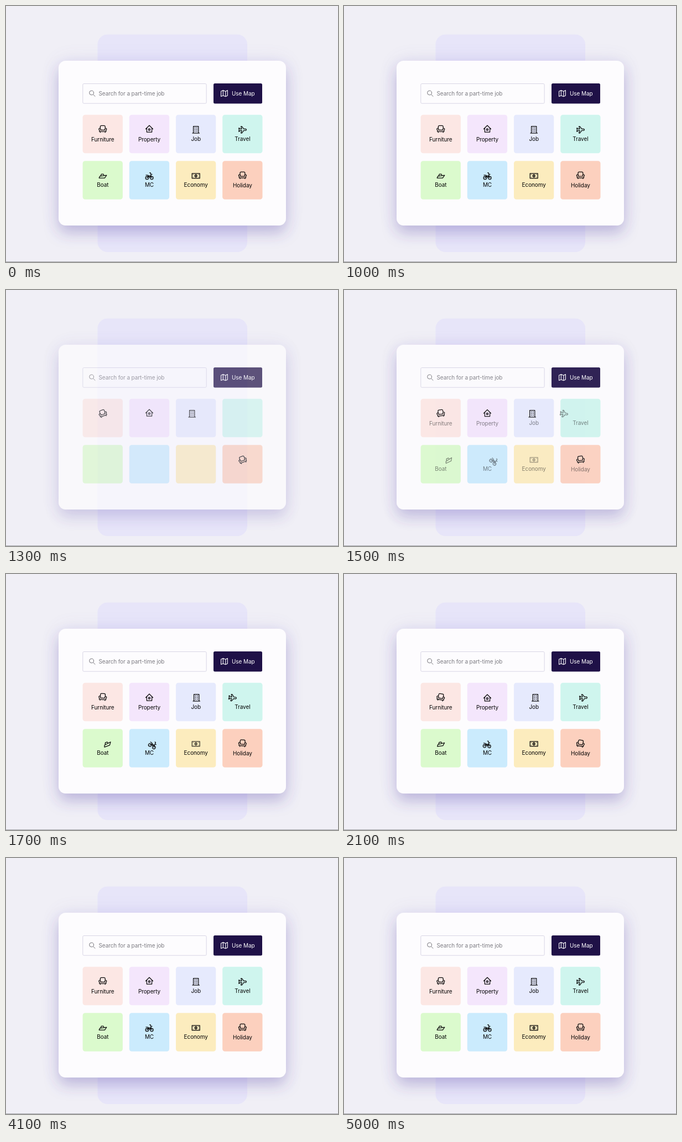
An HTML page that plays this animation: 600x463 px, repeating every 5.1 s.

```html
<!DOCTYPE html>
<html lang="en">
<head>
<meta charset="utf-8">
<title>Category cards</title>
<style>
  html, body { margin: 0; width: 100%; height: 100%; overflow: hidden; background: #f0eff6; }
  svg { display: block; width: 100%; height: 100%; }
  text { font: 400 10px Inter, "Open Sans", sans-serif; letter-spacing: -0.1px; }
  .label { text-anchor: middle; fill: #050505; }
  .icon { fill: none; stroke: #0a0a0a; stroke-width: 1.25; stroke-linejoin: round; stroke-linecap: round; }
  .solid { fill: #0a0a0a; stroke: none; }
</style>
</head>
<body>
<svg viewBox="0 0 600 463" xmlns="http://www.w3.org/2000/svg">
  <defs>
    <filter id="shadow" x="-20%" y="-25%" width="140%" height="155%">
      <feDropShadow dx="0" dy="14" stdDeviation="13" flood-color="#4a3aa0" flood-opacity=".27"/>
    </filter>
    <filter id="glow" x="-20%" y="-25%" width="140%" height="150%">
      <feGaussianBlur stdDeviation="18"/>
    </filter>
  </defs>
  <rect width="600" height="463" fill="#f0eff6"/>
  <rect x="165.5" y="51.5" width="270.5" height="393.5" rx="18" fill="#e7e5f9"/>
  <rect y="462" width="600" height="1" fill="#a5a5aa"/>
  <g id="screen">
    <rect x="95" y="99" width="411" height="298" rx="13" fill="#6a5ac0" opacity=".1" filter="url(#glow)"/>
    <rect x="95" y="99" width="411" height="298" rx="13" fill="#fdfcfe" filter="url(#shadow)"/>
    <rect x="138.8" y="140.5" width="223.4" height="35.7" rx="2" fill="#fdfcfe" stroke="#d8d5e5"/>
    <g fill="none" stroke="#77767c" stroke-width="1" stroke-linecap="round">
      <circle cx="154.6" cy="157" r="3.9"/>
      <path d="M157.5 160 161 163.4"/>
    </g>
    <text x="167.5" y="162.1" fill="#7d7c82">Search for a part-time job</text>
    <rect x="375" y="140" width="88" height="36.5" rx="2.5" fill="#1f1147"/>
    <path d="M388.6 154.2 392.4 152.6 396.8 154.4 400.4 152.6V162L396.8 163.8 392.4 162 388.6 163.6ZM392.4 152.6V162M396.8 154.4V163.8"
      fill="none" stroke="#fff" stroke-width="1.1" stroke-linejoin="round"/>
    <text x="408" y="162.1" fill="#fff">Use Map</text>
    <g id="tiles"></g>
  </g>
</svg>
<script>
const LOOP = 5100;

const sofa = `<path d="M-4.4-1.6V-4Q-4.4-6-2.4-6H2.4Q4.4-6 4.4-4V-1.6
  M-3.8 2V.2A1.6 1.6 0 1 0-6 1.9V4.8H6V1.9A1.6 1.6 0 1 0 3.8.2V2ZM-4.4 5V6.4M4.4 5V6.4"/>`;
const home = `<path d="M-6.5.5 0-6 6.5.5M-4.6-1V6H4.6V-1"/>
  <rect x="-1.4" y="0" width="2.8" height="2.8"/>`;
const windows = [-3.3, -.3, 2.7].map(y =>
  `<rect class="solid" x="-2.4" y="${y - .7}" width="1.5" height="1.5"/>
   <rect class="solid" x=".9" y="${y - .7}" width="1.5" height="1.5"/>`).join("");
const block = `<path d="M-4.6 6V-6H4.6V6M-6.2 6.2H6.2"/>${windows}`;
const plane = `<path d="M7 0Q7-1.4 5.5-1.4H2.3L-1.1-6H-2.8L-1.4-1.4H-4.2L-5.5-3H-6.8L-6 0
  -6.8 3H-5.5L-4.2 1.4H-1.4L-2.8 6H-1.1L2.3 1.4H5.5Q7 1.4 7 0Z"/>`;
const boat = `<path d="M-6.6 3.8-5.2.5 7-1.2 3.5 3.8ZM-3.9.2-2.4-3.2H1.3L2.2-.6"/>`;
const bike = `<circle cx="-4.1" cy="3.5" r="2.7"/><circle cx="4.3" cy="3.5" r="2.7"/>
  <path d="M-4.1 3.5-1.8-.2H3L4.3 3.5M-6-1.6-2.4-1.2.4 2.4 3-.2M.6-5.8H2.2L3.2-.2M3-3H5"/>`;
const note = `<rect x="-7" y="-4.3" width="14" height="8.6"/><ellipse rx="1.9" ry="2.4"/>
  <path d="M0-.8V.8M-5-2.4V-2.3M5-2.4V-2.3M-5 2.3V2.4M5 2.3V2.4"/>`;

// Motion tracks: values at the KEYS times; at rest before and after.
const KEYS = [1000, 1300, 1700, 2100, 2500];
const rock = { rot: [0, -20, 4, 10, 0], y: [0, .8, 0, .4, 0] };
const hidden = [1, 0, 1, 1, 1];

const tiles = [
  { name: "Furniture", fill: "#fce7e4", art: sofa, iy: 222.3, ty: 244.6, move: rock },
  { name: "Property", fill: "#f4e6fc", art: home, iy: 222, ty: 244.6, move: { y: [0, 0, 1, 2, 0] } },
  { name: "Job", fill: "#e6eafd", art: block, iy: 223.7, ty: 243.6,
    move: { x: [0, -7, 1, 2.6, 0] } },
  { name: "Travel", fill: "#cff5ee", art: plane, iy: 223.8, ty: 243.6,
    move: { x: [0, -42, -18, 5, 0], rot: [0, 10, 6, -2, 0], show: hidden } },
  { name: "Boat", fill: "#dbfacd", art: boat, iy: 307.3, ty: 326.9,
    move: { x: [0, 20, 8, 0, 0], rot: [0, -30, -20, -7, 0], show: hidden } },
  { name: "MC", fill: "#cbebfd", art: bike, iy: 307.4, ty: 326.9,
    move: { x: [0, 18, 6.5, -.6, 0], y: [0, 2, 1, .5, 0], rot: [0, 55, 32, 4, 0], show: hidden } },
  { name: "Economy", fill: "#fcecbe", art: note, iy: 307.2, ty: 326.9,
    move: { show: [1, 0, .8, 1, 1] } },
  { name: "Holiday", fill: "#fcd0be", art: sofa, iy: 306, ty: 328.2, move: rock }
];

const screen = document.getElementById("screen");
document.getElementById("tiles").innerHTML = tiles.map((tile, i) => {
  const x = 138.6 + (i % 4) * 84.2;
  const y = i < 4 ? 196.8 : 280.3;
  tile.cx = x + 36.2;
  return `<rect x="${x}" y="${y}" width="72.3" height="69.4" rx="4.5" fill="${tile.fill}"/>
    <g class="icon">${tile.art}</g>
    <text class="label" x="${tile.cx}" y="${tile.ty}">${tile.name}</text>`;
}).join("");
const icons = document.querySelectorAll(".icon");
const labels = document.querySelectorAll(".label");

const clamp = v => Math.min(1, Math.max(0, v));
const smooth = p => p * p * (3 - 2 * p);

function track(t, times, values) {
  if (t <= times[0]) return values[0];
  for (let i = 1; i < times.length; i++) {
    if (t < times[i]) {
      const p = smooth((t - times[i - 1]) / (times[i] - times[i - 1]));
      return values[i - 1] + (values[i] - values[i - 1]) * p;
    }
  }
  return values[values.length - 1];
}

function draw(t) {
  // Two equal layers dissolving into each other dip in the middle.
  const p = smooth(clamp((t - 1000) / 600));
  screen.setAttribute("opacity", 1 - 1.2 * p * (1 - p));

  const labelShow = track(t, [1000, 1250, 1350, 1650], [1, 0, 0, 1]);
  tiles.forEach((tile, i) => {
    const at = (key, rest) => tile.move[key] ? track(t, KEYS, tile.move[key]) : rest;
    const x = tile.cx + at("x", 0);
    const y = tile.iy + at("y", 0);
    icons[i].setAttribute("transform", `translate(${x} ${y}) rotate(${at("rot", 0)})`);
    icons[i].setAttribute("opacity", at("show", 1));
    labels[i].setAttribute("opacity", labelShow);
  });
}

const start = performance.now();
function tick() {
  draw((performance.now() - start) % LOOP);
  requestAnimationFrame(tick);
}
draw(0);
requestAnimationFrame(tick);
</script>
</body>
</html>
```
